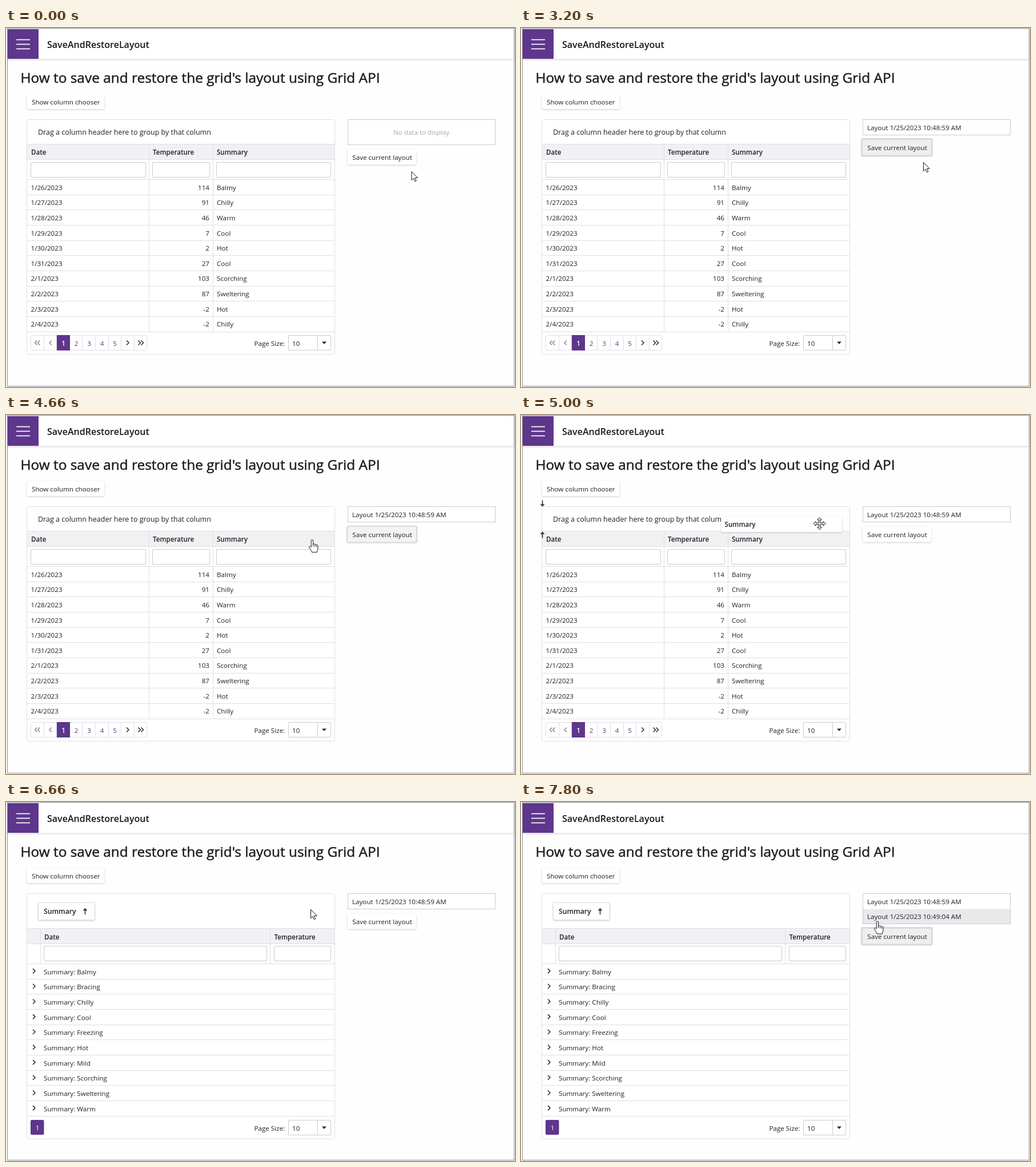
An HTML page that plays this animation: 891x629 px, repeating every 8 s.

```html
<!DOCTYPE html>
<html lang="en">
<head>
<meta charset="utf-8">
<title>Save and restore layout</title>
<style>
html, body { margin: 0; width: 100%; height: 100%; overflow: hidden; background: #fefefe; }
svg { display: block; }
text { font: 11.63px "Open Sans", "Noto Sans", sans-serif; fill: #1f1e24; white-space: pre; }
.head { font-size: 11.6px; font-weight: 600; }
.chip { font-size: 12.2px; font-weight: 600; }
.hint { font-size: 12.5px; }
.title { font-size: 16.05px; font-weight: 600; fill: #15171a; }
.heading { font-size: 24.4px; fill: #1b1f24; stroke: #1b1f24; stroke-width: .5px; }
.raised { filter: drop-shadow(0 1px 1.5px rgba(0, 0, 0, .2)); }
</style>
</head>
<body>
<svg id="stage" width="891" height="629" viewBox="0 0 891 629">
  <g id="page"></g>
  <g id="flat"></g>
  <g id="grouped"></g>
  <g id="live"></g>
</svg>
<script>
const LOOP = 8000;
const PURPLE = '#5e368c', LINE = '#e0dfe5', FIELD = '#cbc9d1', INK = '#2b2a30';
const $ = id => document.getElementById(id);

// Markup helpers
const rect = (x, y, w, h, fill = '#fff', stroke = 'none', extra = '') =>
  `<rect x="${x}" y="${y}" width="${w}" height="${h}" fill="${fill}" stroke="${stroke}" ${extra}/>`;
const text = (x, y, s, cls = '', extra = '') => `<text x="${x}" y="${y}" class="${cls}" ${extra}>${s}</text>`;
const path = (d, stroke = INK, fill = 'none', extra = '') =>
  `<path d="${d}" stroke="${stroke}" fill="${fill}" ${extra}/>`;
const hline = (x1, x2, y) => path(`M${x1} ${y}H${x2}`, LINE);
const vline = (x, y1, y2) => path(`M${x} ${y1}V${y2}`, LINE);
const raised = (x, y, w, h, fill = '#fff') => rect(x, y, w, h, fill, 'none', 'rx="2" class="raised"');
const field = (x, y, w) => rect(x, y, w, 26, '#fff', FIELD, 'rx="1.5"');
const middle = 'text-anchor="middle"';
const upArrow = (x, y, dir = 1) =>
  path(`M${x} ${y + 5 * dir}V${y - 4 * dir}M${x - 3} ${y - 1.5 * dir}L${x} ${y - 5 * dir}L${x + 3} ${y - 1.5 * dir}`,
    INK, 'none', 'stroke-width="1.6"');
const chevron = (x, y, dir, color = INK) =>
  path(`M${x - 2 * dir} ${y - 4}L${x + 2 * dir} ${y}L${x - 2 * dir} ${y + 4}`, color, 'none', 'stroke-width="1.5"');

const pageSize = y => text(434.5, y + 18.3, 'Page Size:') + field(494.5, y, 74) + text(501, y + 18.3, '10') +
  path(`M545.5 ${y}v26`, FIELD) + path(`M553 ${y + 11}h8l-4 4.5z`, 'none', INK);

function gridFrame(headTop, bottom, columns, lineEnd) {
  return rect(36.5, 160.5, 539, bottom - 160.5, '#fff', LINE, 'rx="3"') +
    rect(37, headTop, 538, 27, '#f1f1f4') + hline(37, 575, headTop - .5) + hline(37, 575, headTop + 26.5) +
    columns.map(x => vline(x, headTop, lineEnd)).join('');
}

function rowLines(top) {
  return Array.from({ length: 11 }, (_, i) => hline(37, 575, Math.round(top + i * 26.65) + .5)).join('');
}

function drawPage() {
  const bars = [20.5, 28.5, 36.5].map(y => path(`M18 ${y}H42`, '#fff', 'none', 'stroke-width="1.7"')).join('');
  return rect(2.5, .5, 887, 627, '#fefefe', '#909094') +
    rect(3, 1.5, 886, 53, '#fff', 'none', 'class="raised"') +
    rect(3, 2, 54, 52, PURPLE) + bars +
    text(72, 34.7, 'SaveAndRestoreLayout', 'title') +
    text(25.5, 95.8, "How to save and restore the grid's layout using Grid API", 'heading') +
    raised(36.5, 116, 136, 26) + text(45, 133.5, 'Show column chooser');
}

function drawFlat() {
  const temps = [114, 91, 46, 7, 2, 27, 103, 87, -2, -2];
  const words = 'Balmy Chilly Warm Cool Hot Cool Scorching Sweltering Hot Chilly'.split(' ');
  let out = gridFrame(204, 571.5, [250.5, 362.5], 531.5) + rowLines(265) +
    text(56, 187.3, 'Drag a column header here to group by that column', 'hint') +
    text(44, 221.7, 'Date', 'head') + text(257, 221.7, 'Temperature', 'head') + text(369, 221.7, 'Summary', 'head') +
    field(43.5, 235.5, 201) + field(256.5, 235.5, 100) + field(368.5, 235.5, 200);
  words.forEach((word, i) => {
    const y = 283.7 + i * 26.62;
    const date = new Date(2023, 0, 26 + i);
    out += text(43.5, y, `${date.getMonth() + 1}/${date.getDate()}/2023`) +
      text(356, y, temps[i], '', 'text-anchor="end"') + text(369, y, word);
  });
  out += rect(43.5, 538.5, 203, 26, '#fff', LINE, 'rx="2"');
  for (let i = 1; i < 9; i++) out += vline(Math.round(43 + i * 22.6) + .5, 538.5, 564.5);
  out += rect(89, 538, 23, 27, PURPLE);
  for (let n = 1; n < 6; n++)
    out += text(78 + n * 22.5, 556.8, n, '', `${middle} style="fill:${n > 1 ? PURPLE : '#fff;font-weight:600'}"`);
  const grey = '#8b8a91';
  out += chevron(52.5, 551.5, -1, grey) + chevron(57.5, 551.5, -1, grey) + chevron(78, 551.5, -1, grey) +
    chevron(213, 551.5, 1) + chevron(233.5, 551.5, 1) + chevron(238.5, 551.5, 1);
  return out + pageSize(538.5);
}

function drawGrouped() {
  const names = 'Balmy Bracing Chilly Cool Freezing Hot Mild Scorching Sweltering Warm'.split(' ');
  let out = gridFrame(222, 590, [60.5, 462.5], 283) + rowLines(283) +
    rect(56.5, 176.5, 98.5, 30, '#fff', LINE, 'rx="2" class="raised"') +
    text(66, 196.3, 'Summary', 'chip') + upArrow(138.5, 192) +
    text(67, 240.5, 'Date', 'head') + text(469.5, 240.5, 'Temperature', 'head') +
    field(66.5, 252.5, 390) + field(469.5, 252.5, 99);
  names.forEach((name, i) => {
    const y = 301.6 + i * 26.67;
    out += chevron(49, y - 5.5, 1) + text(66, y, 'Summary: ' + name);
  });
  return out + rect(43, 557, 23.5, 26, PURPLE, 'none', 'rx="2"') +
    text(55, 574.8, 1, '', `${middle} style="fill:#fff"`) + pageSize(557.5);
}

// Cursors, with the hot spot at 0,0
const quarter = [[-1.3, -1.3], [-1.3, -6.5], [-3.8, -6.5], [0, -10.7], [3.8, -6.5], [1.3, -6.5]];
const turns = [([x, y]) => [x, y], ([x, y]) => [-y, x], ([x, y]) => [-x, -y], ([x, y]) => [y, -x]];
const CURSORS = {
  arrow: 'M.5.5V15.6L4 12.4 6.4 17.8 8.8 16.8 6.4 11.4H11.2Z',
  hand: 'M-1.7 13V2a1.7 1.7 0 0 1 3.4 0V8.2c.4-1.3 2.9-1 3.1.5c.6-1 2.7-.7 2.9.8c.7-.8 2.4-.3 2.4 1.2V15' +
    'c0 3-1.7 4-1.7 7H-.5C-1 19-4.5 16-5.2 13.3c-.4-1.7 1.6-2.3 2.6-.9z',
  move: 'M' + turns.flatMap(turn => quarter.map(turn)).join('L') + 'Z'
};

// Motion
const ramp = (t, a, b) => Math.min(1, Math.max(0, (t - a) / (b - a)));
const smooth = u => u * u * (3 - 2 * u);
const easeOut = u => u * (2 - u);
// start, end, from x, y, to x, y, easing, sag
const MOVES = [
  [1030, 1560, 709.5, 251, 707, 234.5, smooth, 0],
  [2030, 2260, 707, 234.5, 704, 235, smooth, 0],
  [3200, 4000, 704, 235, 536.5, 221, smooth, 9],
  [4030, 4130, 536.5, 221, 536, 218.5, smooth, 0],
  [4660, 5130, 536, 218.5, 521.5, 188, easeOut, 0],
  [5830, 5960, 521.5, 188, 522.5, 187, smooth, 0],
  [6660, 7300, 533, 188, 624, 209, smooth, 0]
];

function cursorAt(t) {
  const [a, b, x0, y0, x1, y1, ease, sag] = MOVES.findLast(m => t >= m[0]) || MOVES[0];
  const e = ease(ramp(t, a, b));
  return [x0 + (x1 - x0) * e, y0 + (y1 - y0) * e + sag * Math.sin(Math.PI * e)];
}

function drawLive(t) {
  const [x, y] = cursorAt(t);
  const saved = (t >= 2120) + (t >= 7690);
  const listEnd = [204.5, 187.5, 213.5][saved];
  const top = listEnd + 8.5;
  const focus = ramp(t, 2030, 2100) - ramp(t, 4620, 4780) + ramp(t, 7600, 7660);
  const overButton = x > 598 && x < 718 && y > top && y < top + 26.5;
  const overItem = saved === 2 && y < listEnd;
  const dragging = t >= 4740 && t < 5360;

  let out = rect(598.5, 160.5, 258, listEnd - 160.5, '#fff', FIELD);
  if (overItem) out += rect(599, 187.5, 257, 25.5, '#e9e9ec');
  if (!saved) out += text(727, 187.2, 'No data to display', '', `${middle} style="fill:#a6a5ab"`);
  ['10:48:59', '10:49:04'].slice(0, saved).forEach((time, i) => {
    out += text(606, 178.7 + i * 26.5, `Layout 1/25/2023 ${time} AM`);
  });

  const shade = Math.round(255 - 16 * Math.max(focus, overButton));
  const face = `rgb(${shade},${shade},${shade})`;
  const ring = 3 * focus;
  out += focus > 0
    ? rect(598 - ring, top - ring, 120 + 2 * ring, 26.5 + 2 * ring, '#d9d9db', 'none', 'rx="4"') +
      rect(598, top, 120, 26.5, face, 'none', 'rx="2"')
    : raised(598, top, 120, 26.5, face);
  out += text(606.3, top + 17.5, 'Save current layout');

  if (dragging) {
    if (y < 204) out += upArrow(37.5, 154.5, -1) + upArrow(37.5, 210.5);
    out += raised(x - 172.5, y - 12.3, 212, 27) + text(x - 166, y + 5.3, 'Summary', 'head');
  }

  const kind = t >= 4740 && t < 5830 ? 'move'
    : overButton || overItem || (t >= 4030 && t < 4740) ? 'hand' : 'arrow';
  out += path(CURSORS[kind], '#111', '#fff', `transform="translate(${x} ${y})" stroke-linejoin="round"`);
  if (kind === 'hand')
    out += path('M1.7 8V12M4.8 9V12.5M7.7 10V13', '#111', 'none', `transform="translate(${x} ${y})"`);
  return out;
}

$('page').innerHTML = drawPage();
$('flat').innerHTML = drawFlat();
$('grouped').innerHTML = drawGrouped();

function frame() {
  const t = performance.now() % LOOP;
  const isGrouped = t >= 5360;
  $('flat').style.display = isGrouped ? 'none' : '';
  $('grouped').style.display = isGrouped ? '' : 'none';
  $('live').innerHTML = drawLive(t);
  requestAnimationFrame(frame);
}
frame();
</script>
</body>
</html>
```
